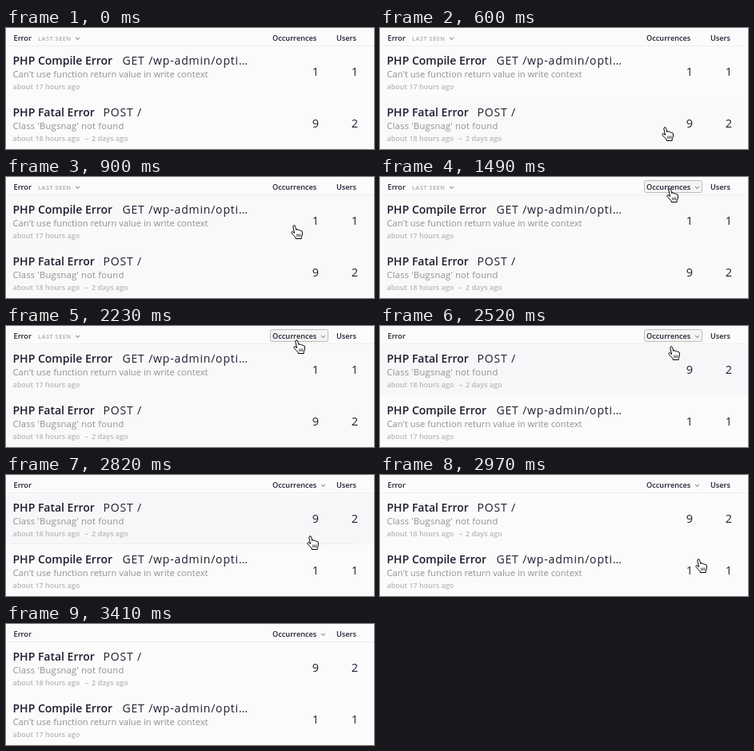
Recreate the animation shown at these times as an HTML page. Size 460 px wide and 152 px high, loop 3980 ms.

```html
<!DOCTYPE html>
<html lang="en">
<head>
<meta charset="utf-8">
<style>
  html, body { margin: 0; width: 460px; height: 152px; overflow: hidden; background: #fbfbfb; }
  svg { display: block; font-family: "Open Sans", "Noto Sans", sans-serif; fill: #1e1e30; }
  .head { font-size: 9.2px; font-weight: 600; }
  .sort { font-size: 7.3px; font-weight: 600; letter-spacing: .55px; fill: #aaa; }
  .title { font-size: 14px; font-weight: 600; }
  .path { font-size: 14px; letter-spacing: .82px; }
  .detail { font-size: 11.2px; font-weight: 500; fill: #909090; }
  .time { font-size: 9px; font-weight: 600; fill: #b8b8b8; }
  .count { font-size: 14.5px; text-anchor: end; }
  .chevron { fill: none; stroke: #999; stroke-width: 1.1; }
</style>
</head>
<body>
<svg width="460" height="152" viewBox="0 0 460 152">
  <rect class="bg" y="24" width="460" height="63"/>
  <rect class="bg" y="87" width="460" height="65"/>
  <path d="M0 22.5H460" stroke="#eee"/>
  <path id="divider" d="M9 86.5H439" stroke="#ececee"/>

  <text class="head" x="9.5" y="16">Error</text>
  <g id="lastSeen">
    <text class="sort" x="40" y="16">LAST SEEN</text>
    <path class="chevron" d="M87 11.8l2.5 2.6 2.5-2.6"/>
  </g>
  <rect id="button" x="330.5" y="4.5" width="72" height="15" rx="2" fill="#f4f4f4" stroke="#bcbcbc"/>
  <text class="head" x="333" y="16">Occurrences</text>
  <path id="chevron" class="chevron" d="M394 11.8l2.5 2.6 2.5-2.6"/>
  <text class="head" x="413" y="16">Users</text>

  <g id="compile">
    <text class="title" x="8.5" y="46">PHP Compile Error</text>
    <text class="path" x="145.5" y="46">GET /wp-admin/opti…</text>
    <text class="detail" x="8.5" y="62">Can't use function return value in write context</text>
    <text class="time" x="8.5" y="76.5">about 17 hours ago</text>
    <text class="count" x="391" y="59.5">1</text>
    <text class="count" x="440" y="59.5">1</text>
  </g>
  <g id="fatal">
    <text class="title" x="8.5" y="46">PHP Fatal Error</text>
    <text class="path" x="121.5" y="46">POST /</text>
    <text class="detail" x="8.5" y="62" letter-spacing=".2">Class 'Bugsnag' not found</text>
    <text class="time" x="8.5" y="76.5">about 18 hours ago</text>
    <text class="time" x="98.5" y="76.5">–</text>
    <text class="time" x="107" y="76.5">2 days ago</text>
    <text class="count" x="391" y="59.5">9</text>
    <text class="count" x="440" y="59.5">2</text>
  </g>

  <g id="cursor" stroke="#000" stroke-linejoin="round">
    <path fill="#fff" d="M4.6 10.6L2.9 3Q2.6 1 4 .7Q5.3 .6 5.7 2.4L6.7 6.5Q6.9 5.6 8 5.7Q9.2 5.9 9.4 7Q9.7 6.3 10.7 6.5Q11.7 6.8 11.9 7.8Q12.3 7.2 13.2 7.5Q14.3 7.9 14.4 9V12Q14.2 14 13.2 15.5V17.5H6.2V16Q3.5 13.5 1.2 10.6Q.4 9.4 1.4 8.7Q2.5 8.2 4.6 10.6Z"/>
    <path fill="none" stroke-width=".8" d="M7.8 11.5v3.5M9.8 11.5v3.5M11.8 11.5v3.5"/>
  </g>
</svg>
<script>
const LOOP = 3980, SORTED = 2370, ROW = 65;
const PLAIN = '#fbfbfb', DIM = '#f9f9f9', HOVER = '#f7f7f9';

// pointer steps: time, x, y
const steps = [
  [600, 352, 124], [750, 354, 81], [900, 356, 60], [1050, 357, 38],
  [1200, 357, 23], [1340, 357, 16], [1490, 358, 14], [2230, 359, 17],
  [2370, 360, 21], [2520, 360, 25], [2670, 365, 43], [2820, 376, 76],
  [2970, 394, 105], [3120, 415, 131], [3260, 421, 144], [3410, 421, 160]
];
// row shades: time, upper, lower
const shades = [
  [0, PLAIN, PLAIN], [600, PLAIN, DIM], [750, DIM, DIM],
  [2370, PLAIN, PLAIN], [2520, HOVER, PLAIN], [2970, PLAIN, PLAIN]
];

const el = id => document.getElementById(id);
const show = (id, on) => el(id).setAttribute('visibility', on ? 'visible' : 'hidden');
const move = (id, x, y) => el(id).setAttribute('transform', `translate(${x} ${y})`);
const latest = (list, t) => list.filter(s => s[0] <= t).pop();
const rows = document.querySelectorAll('.bg');

function draw(t) {
  const sorted = t >= SORTED;
  move('compile', 0, sorted ? ROW : 0);
  move('fatal', 0, sorted ? 0 : ROW);
  show('lastSeen', !sorted);
  show('button', t >= 1340 && t < 2670);
  show('chevron', t >= 1340);
  show('divider', t >= 2670 && t < 2970);

  const [, ...fills] = latest(shades, t);
  fills.forEach((fill, i) => rows[i].setAttribute('fill', fill));

  const step = latest(steps, t);
  show('cursor', step);
  if (step) move('cursor', step[1], step[2]);
}

const start = performance.now();
function tick() {
  draw((performance.now() - start) % LOOP);
  requestAnimationFrame(tick);
}
tick();
</script>
</body>
</html>
```
